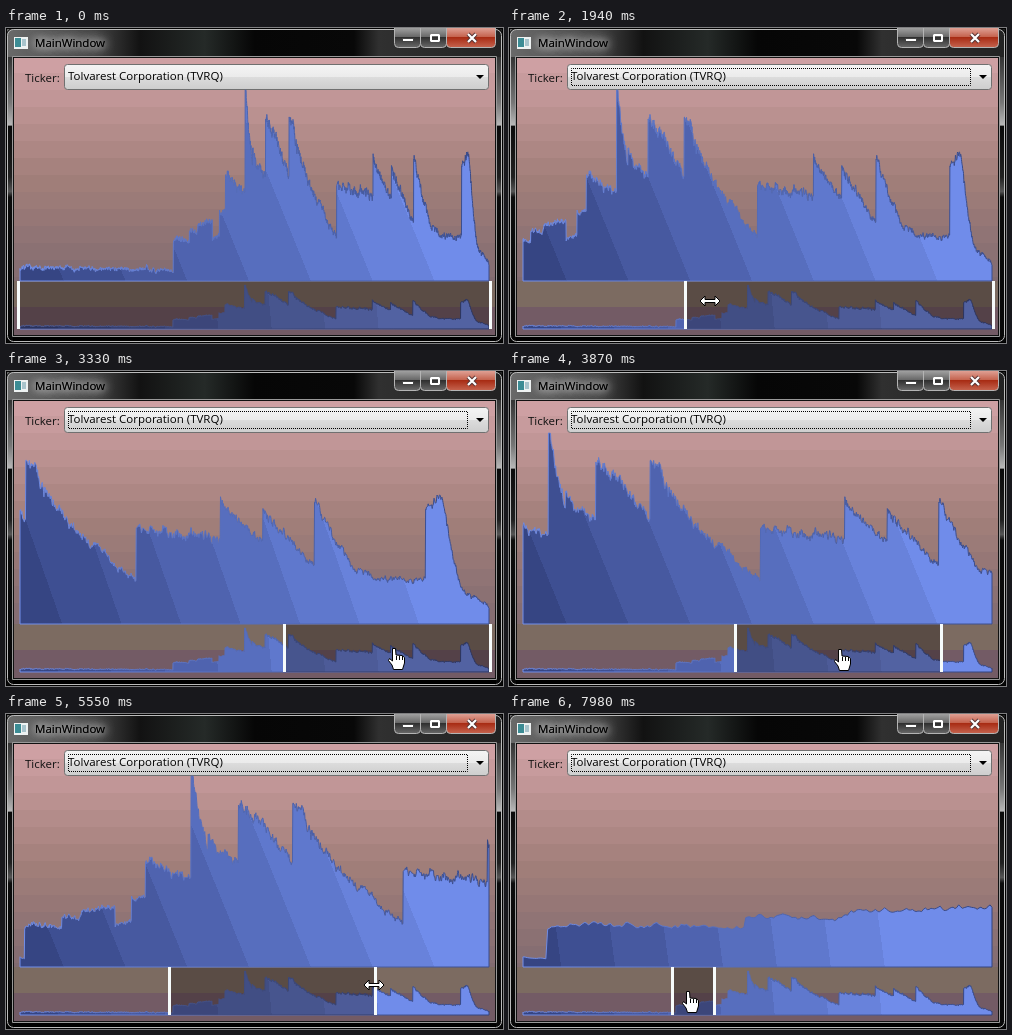
An HTML page with a canvas that plays this animation: 497 px wide and 315 px high, repeating every 8 s.

```html
<!DOCTYPE html>
<html lang="en">
<head>
<meta charset="utf-8">
<title>MainWindow</title>
<style>
html, body { margin: 0; height: 100%; overflow: hidden; background: #000; }
canvas { display: block; }
</style>
</head>
<body>
<canvas id="stage" width="497" height="315"></canvas>
<script>
const ctx = document.getElementById('stage').getContext('2d');
const LOOP = 8000, LEFT = 14, RIGHT = 483, BASE = 253, PEAK = 191, STEP = 0.15;
const FONT = '11.5px "Open Sans", "Noto Sans", sans-serif';

// Price trends: start position, first height, last height.
const trends = [
  [14, 13, 11], [167, 42, 38], [183, 46, 60], [206, 40, 45], [213, 68, 71], [219, 105, 88],
  [238.6, 191, 110], [246, 125, 104], [259, 166, 108], [282.4, 163, 96], [302, 97, 42],
  [330, 93, 84], [366.3, 127, 80], [384.5, 113, 58], [406.8, 120, 50], [425, 50, 43],
  [454.6, 111, 127], [461.5, 127, 36], [470, 36, 13], [RIGHT, 13, 13]];

const random = i => { const v = Math.sin(i * 12.9898) * 43758.5453; return v - Math.floor(v) - 0.5; };
const noise = x => { const i = Math.floor(x), f = x - i; return random(i) * (1 - f) + random(i + 1) * f; };

const prices = [];
for (let x = LEFT, k = 0; x <= RIGHT; x += STEP) {
  while (trends[k + 1][0] <= x && k < trends.length - 2) k++;
  const [start, first, last] = trends[k];
  const h = first + (last - first) * (x - start) / (trends[k + 1][0] - start);
  let wobble = 0;
  for (const period of [7, 2.4, 0.8, 0.25]) wobble += noise(x / period + 99 * period);
  prices.push(Math.min(PEAK, Math.max(2, h + wobble * (2.5 + h * 0.05))));
}

// Keyframes are rows of time followed by values.
function track(t, rows) {
  let i = 0;
  while (i < rows.length - 1 && rows[i + 1][0] <= t) i++;
  const a = rows[i], b = rows[i + 1] || a;
  const f = b === a ? 0 : Math.max(0, (t - a[0]) / (b[0] - a[0]));
  return a.slice(1).map((v, n) => v + (b[n + 1] - v) * f);
}
const leftDrag = [[1400, 12], [1940, 176], [2240, 240], [2660, 278]];
const rightDrag = [[5820, 484], [6720, 358], [7620, 320]];
const panDrag = [[3380, 0], [4280, -98], [4520, -115]];
const pointer = [
  [330, 88, 312], [920, 12, 273], [1400, 12, 273], [1940, 201, 273], [2660, 279, 282], [3320, 388, 277],
  [4280, 286, 278], [4520, 272, 277], [4740, 272, 277], [4880, 356, 280], [5120, 373, 290],
  [5370, 373, 290], [5540, 368, 271], [5820, 368, 271], [6720, 240, 296], [7620, 205, 305], [7980, 179, 277]];

function box(x, y, w, h, fill) { ctx.fillStyle = fill; ctx.fillRect(x, y, w, h); }
function frame(x, y, w, h, color, radius = 0) {
  ctx.beginPath();
  ctx.roundRect(x + 0.5, y + 0.5, w - 1, h - 1, radius);
  ctx.strokeStyle = color; ctx.lineWidth = 1; ctx.stroke();
}
function gradient(x0, y0, x1, y1, stops) {
  const g = ctx.createLinearGradient(x0, y0, x1, y1);
  for (const [at, color] of stops) g.addColorStop(at, color);
  return g;
}
function mix(a, b, f) { return `rgb(${a.map((v, i) => Math.round(v + (b[i] - v) * f))})`; }
function text(str, x, y, color) {
  ctx.font = FONT; ctx.fillStyle = color; ctx.fillText(str, x, y);
}
function poly(points, fill, stroke) {
  ctx.beginPath();
  points.forEach(([x, y]) => ctx.lineTo(x, y));
  ctx.closePath();
  ctx.fillStyle = fill; ctx.fill();
  if (stroke) { ctx.strokeStyle = stroke; ctx.lineWidth = 1; ctx.stroke(); }
}

function button(x, w, top, mid, low) {
  ctx.beginPath();
  ctx.roundRect(x + 0.5, -4, w - 1, 23.5, [0, 0, 4, 4]);
  ctx.fillStyle = gradient(0, 0, 0, 19, [[0, top], [0.48, mid], [0.5, low], [1, mid]]);
  ctx.fill();
  ctx.strokeStyle = '#b4b4b4'; ctx.lineWidth = 1; ctx.stroke();
}

function drawBackground() {
  const top = [206, 160, 163], middle = [162, 127, 122], bottom = [128, 106, 112];
  for (let y = 28; y < BASE; y += 17) {
    const f = (y - 28) / 112;
    box(8, y, 481, 17, f < 1 ? mix(top, middle, f) : mix(middle, bottom, f - 1));
  }
  box(8, BASE, 481, 26, '#7c6b61');
  box(8, 279, 481, 28, '#735b65');
}

function drawChrome() {
  box(0, 0, 497, 315, '#000');
  box(1, 1, 495, 28, gradient(0, 0, 497, 0, [[0, '#6a6a6a'], [0.18, '#444'], [0.27, '#121212'],
    [0.4, '#252a28'], [0.5, '#060606'], [0.7, '#080808'], [0.75, '#303030'], [1, '#222']]));
  const side = gradient(0, 29, 0, 315, [[0, '#333'], [0.16, '#777'], [0.238, '#b8b8b8'], [0.242, '#0a0a0a'],
    [0.42, '#202020'], [0.47, '#555'], [0.49, '#0c0c0c'], [1, '#080808']]);
  box(1, 29, 6, 285, side);
  box(490, 29, 6, 285, side);
  drawBackground();
  frame(0, 0, 497, 315, '#000', 7);
  frame(1, 1, 495, 313, '#bbb', 6);
  frame(6, 28, 485, 281, '#999');
  frame(7, 29, 483, 279, '#111');

  box(8, 9, 14, 12, '#eef2f2');
  box(9, 10, 6, 9, '#3c8c94');
  box(16, 11, 4, 7, '#a8c4cc');
  ctx.save();
  ctx.shadowColor = '#fff'; ctx.shadowBlur = 10;
  for (let i = 0; i < 2; i++) text('MainWindow', 29, 19, '#000');
  ctx.restore();

  button(388, 27, '#a0a0a0', '#666', '#303030');
  button(414, 27, '#a0a0a0', '#666', '#303030');
  button(440, 50, '#dfa094', '#c4614c', '#a82c14');
  box(396, 10, 12, 4, '#444'); box(397, 11, 10, 2, '#fff');
  ctx.strokeStyle = '#fff'; ctx.lineWidth = 2; ctx.strokeRect(425, 7, 8, 6);
  for (const [color, width] of [['#533', 4], ['#fff', 2.2]]) {
    ctx.beginPath();
    ctx.moveTo(462, 6); ctx.lineTo(470, 14); ctx.moveTo(470, 6); ctx.lineTo(462, 14);
    ctx.strokeStyle = color; ctx.lineWidth = width; ctx.stroke();
  }
}

function drawCombo(focused) {
  text('Ticker:', 19, 54, '#111');
  ctx.beginPath();
  ctx.roundRect(58.5, 36.5, 424, 25, 3);
  ctx.fillStyle = gradient(0, 37, 0, 61, [[0, '#f4f4f4'], [0.49, '#ebebeb'], [0.51, '#dcdcdc'], [1, '#cecece']]);
  ctx.fill();
  ctx.strokeStyle = '#707070'; ctx.lineWidth = 1; ctx.stroke();
  text('Tolvarest Corporation (TVRQ)', 62, 52, '#000');
  poly([[470, 47], [478, 47], [474, 51]], '#000');
  if (focused) {
    ctx.setLineDash([1, 1]);
    ctx.lineDashOffset = 0.5;
    frame(62, 40, 400, 18, '#000');
    ctx.setLineDash([]);
  }
}

// Eight even shades with hard edges.
const shades = [];
for (let i = 0; i < 8; i++) {
  const color = mix([54, 69, 131], [112, 140, 234], i / 7);
  const edge = n => Math.min(1, Math.max(0, 0.08 + 0.113 * n));
  shades.push([i ? edge(i - 1) : 0, color], [i < 7 ? edge(i) : 1, color]);
}

// Shows prices from..to across the full width; fill runs along the box diagonal.
function drawArea(from, to, base, scale) {
  const first = Math.max(0, Math.ceil((from - LEFT) / STEP));
  const view = prices.slice(first, Math.floor((to - LEFT) / STEP) + 1);
  const top = base - Math.max(...view) * scale;
  const points = view.map((h, i) =>
    [LEFT + (LEFT + (first + i) * STEP - from) / (to - from) * (RIGHT - LEFT), base - h * scale]);
  const ends = [[RIGHT, points[points.length - 1][1]], [RIGHT, base], [LEFT, base], [LEFT, points[0][1]]];
  ctx.lineJoin = 'bevel';
  poly(points.concat(ends), gradient(LEFT, base, RIGHT, top, shades),
    gradient(LEFT, base, RIGHT, top, [[0, '#7290ec'], [1, '#31427e']]));
}

function drawCursor(x, y, outline) {
  poly(outline.map(([dx, dy]) => [x + dx, y + dy]), '#fff', '#000');
}
const arrowHalf = [[-10, 0], [-5, -5], [-5, -1.5], [5, -1.5], [5, -5], [10, 0]];
const arrows = arrowHalf.concat(arrowHalf.map(([x, y]) => [-x, -y]));
const hand = [[-1.5, 0.5], [1.5, 0.5], [2, 7], [8, 7.5], [10.5, 9.5], [10.5, 15], [8.5, 21.5],
  [-0.5, 21.5], [-2, 17], [-5.5, 12.5], [-4.5, 10.5], [-1.5, 13]];

function draw(now) {
  const time = now % LOOP;
  const offset = time < 5880 ? 20 : 0;
  const t = Math.floor((time - offset) / 60) * 60 + offset; // screen updates every 60 ms
  const [pan] = track(t, panDrag);
  const left = track(t, leftDrag)[0] + pan;
  const right = track(t, rightDrag)[0] + pan;

  drawChrome();
  drawCombo(time >= 60);
  drawArea(left + 2, right - 2, BASE, 1);
  drawArea(LEFT, RIGHT, 301, 0.23);
  box(left, 254, right - left, 47, 'rgba(20,10,10,0.32)');
  for (const x of [left, right]) box(Math.round(x) - 1, 253, 3, 48, '#f6fbfb');

  if (t > 330) {
    const [x, y] = track(t, pointer).map(Math.round);
    const resizing = (t > 800 && t < 2750) || (t >= 5120 && t < 7740);
    drawCursor(x, y, resizing ? arrows : hand);
    if (!resizing) for (const dx of [2, 5, 8]) box(x + dx, y + 8, 1, 4, '#000');
  }
  requestAnimationFrame(() => draw(performance.now() - start));
}
const start = performance.now();
draw(0);
</script>
</body>
</html>
```
